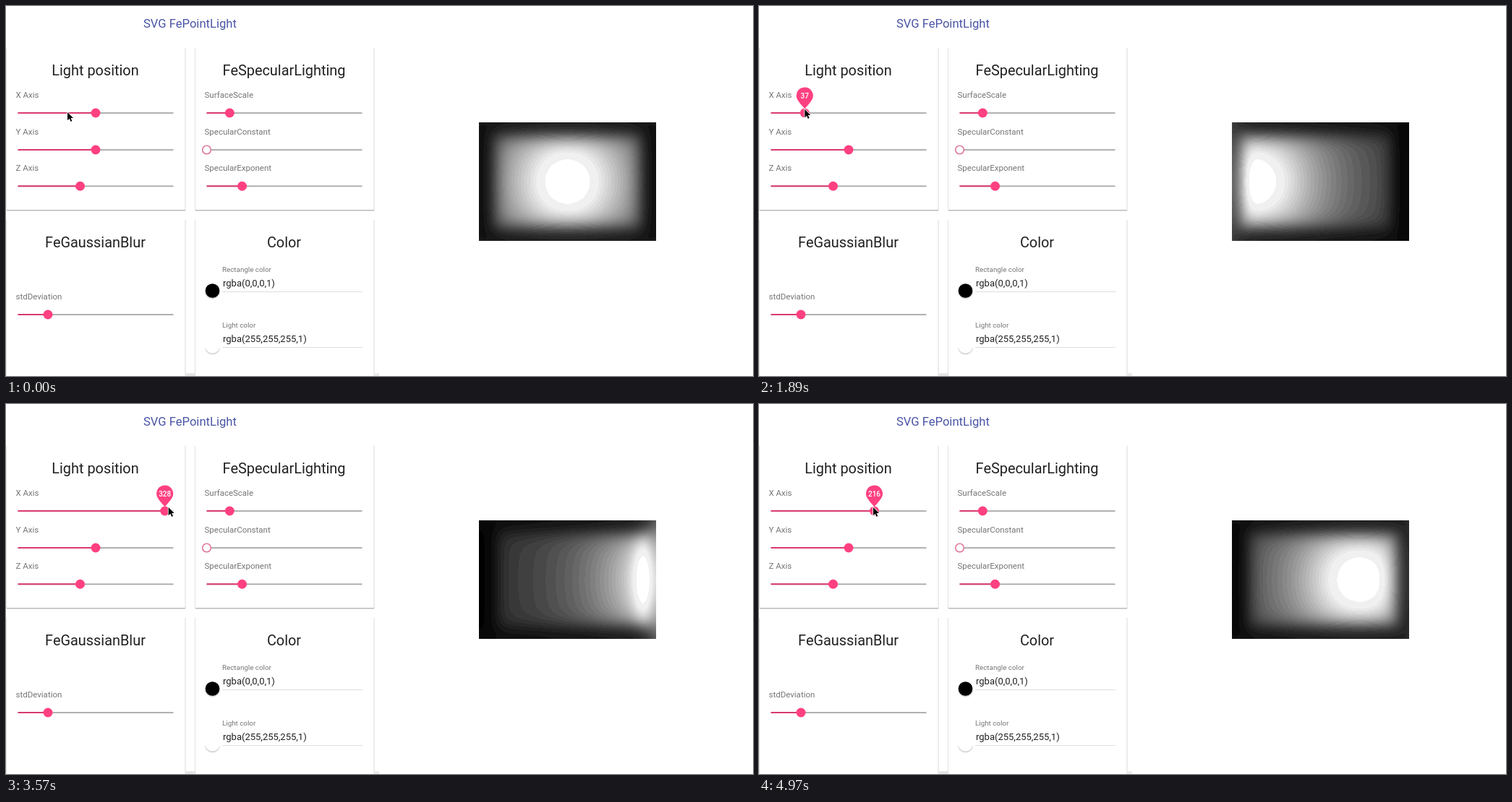
An HTML page with a canvas for the animation above (5.04 s loop, 1033x512 px).

```html
<!DOCTYPE html>
<html lang="en">
<head>
<meta charset="utf-8">
<style>
  html, body { margin: 0; width: 1033px; height: 512px; overflow: hidden; background: #fff; }
  canvas { display: block; }
</style>
</head>
<body>
<canvas id="stage" width="1033" height="512"></canvas>
<script>
const LOOP = 5040, STEP = 70, DRAG_START = 980;
const PINK = '#ff4081', TRACK = 215;
const ctx = document.getElementById('stage').getContext('2d');

// 0 before start, 1 after end, smooth in between
function ease(t, start, end) {
  const p = Math.min(1, Math.max(0, (t - start) / (end - start)));
  return p * p * (3 - 2 * p);
}

// X axis value: drag left, drag right, drag back, small correction
const xAxis = t => 150 - 113 * ease(t, DRAG_START, 1600) + 291 * ease(t, 2740, 3035)
  - 109 * ease(t, 3640, 4130) - 3 * ease(t, 4620, 4900);
const partOf = value => (value + 50) / 400;
const knobX = t => 16.5 + partOf(xAxis(t)) * TRACK;

// The light only catches up with the slider when the pointer rests
const repaints = [0, 1610, 3150, 4480, 4900];
const lightAt = t => xAxis(repaints.filter(r => r <= t).pop());

const cursorX = t => knobX(t) - 39 * (1 - ease(t, 0, 840))
  + 5 * ease(t, 3000, 3400) - 6.5 * ease(t, 3640, 4130);
const cursorY = t => 147 + 5 * ease(t, 0, 840) - 9 * ease(t, DRAG_START, 1470);

function text(str, x, y, size, color, align = 'left', weight = 400) {
  ctx.font = `${weight} ${size}px Roboto, sans-serif`;
  ctx.textAlign = align;
  ctx.fillStyle = color;
  ctx.fillText(str, x, y);
}

function rect(x, y, w, h, color) {
  ctx.fillStyle = color;
  ctx.fillRect(x, y, w, h);
}

function disc(x, y, r, color) {
  ctx.fillStyle = color;
  ctx.beginPath();
  ctx.arc(x, y, r, 0, 7);
  ctx.fill();
}

function card(x, y, h, title) {
  rect(x, y, 1, h, '#e2e2e2');
  rect(x + 247.5, y, 1, h, '#dcdcdc');
  rect(x + 1, y + h - 1, 247, 1, '#b8b8b8');
  rect(x + 1, y + h, 247, 1, '#dedede');
  text(title, x + 123.5, y + 38, 19.9, '#212121', 'center');
}

function slider(label, x, y, part) {
  text(label, x, y - 21, 11.5, '#757575');
  const left = x + 3, knob = left + part * TRACK;
  rect(left, y - 0.75, TRACK, 1.7, '#a4a4a4');
  if (part) {
    rect(left, y - 1, knob - left, 2, '#d93a72');
    disc(knob, y, 6.5, PINK);
  } else {
    disc(knob, y, 6.6, '#e07aa0');
    disc(knob, y, 4.9, '#fff');
  }
}

function colorField(label, value, y, swatch) {
  ctx.save();
  ctx.shadowBlur = 2;
  ctx.shadowOffsetY = 1;
  ctx.shadowColor = 'rgba(0,0,0,.3)';
  disc(285.5, y + 10, 9.8, swatch);
  ctx.restore();
  if (swatch === '#fff') rect(272, y - 4, 26, 16, '#fff');
  text(label, 299, y - 16, 9.8, '#757575');
  text(value, 300, y + 4, 13, '#212121');
  rect(299, y + 11, 194, 1, '#dedede');
}

function pin(x, value, grow) {
  ctx.save();
  ctx.translate(x, 142);
  ctx.scale(grow, grow);
  ctx.fillStyle = PINK;
  ctx.beginPath();
  ctx.arc(0, -18, 11.5, Math.PI * 0.83, Math.PI * 0.17);
  ctx.quadraticCurveTo(7, -7, 0, 0);
  ctx.quadraticCurveTo(-7, -7, -10, -12.2);
  ctx.fill();
  text(Math.round(value), 0, -14.3, 10, '#fff', 'center', 500);
  ctx.restore();
}

function cursor(x, y) {
  const arrow = new Path2D('M0 0V11.2L2.7 8.8L4.5 12.9L6.3 12.1L4.5 8.1H8Z');
  ctx.save();
  ctx.translate(x, y);
  ctx.strokeStyle = '#fff';
  ctx.lineWidth = 1.6;
  ctx.stroke(arrow);
  ctx.fillStyle = '#000';
  ctx.fill(arrow);
  ctx.restore();
}

// Specular point light over the blurred edge of a 300 x 200 plate
const W = 245, H = 164, SIGMA = 19.5, HEIGHT = 16.6, LIGHT_Z = 147, GAIN = 1.1, EXPONENT = 9.5;
const edge = u => 1 / (1 + Math.exp(-1.5976 * u - 0.07056 * u ** 3));
const profile = (u, len) => edge(u / SIGMA) - edge((u - len) / SIGMA);
const samples = (count, len) => Array.from({ length: count }, (_, i) => {
  const u = (i + 0.5) * len / count;
  return { u, alpha: profile(u, len), slope: profile(u + 0.5, len) - profile(u - 0.5, len) };
});
const cols = samples(W, 300), rows = samples(H, 200);
const plate = ctx.createImageData(W, H);
let litFor = null;

function shade(lightX) {
  if (lightX === litFor) return;
  litFor = lightX;
  let p = 0;
  for (const row of rows) for (const col of cols) {
    const nx = -HEIGHT * col.slope * row.alpha, ny = -HEIGHT * row.slope * col.alpha;
    const lx = lightX - col.u, ly = 100 - row.u, lz = LIGHT_Z - HEIGHT * col.alpha * row.alpha;
    const hz = lz + Math.hypot(lx, ly, lz);
    const dot = (nx * lx + ny * ly + hz) / (Math.hypot(nx, ny, 1) * Math.hypot(lx, ly, hz));
    const level = GAIN * Math.max(0, dot) ** EXPONENT;
    const gray = level >= 1 ? 255 : Math.min(240, Math.round(level * 32) * 8);
    plate.data.fill(gray, p, p + 3);
    plate.data[p + 3] = 255;
    p += 4;
  }
}

function draw(t) {
  rect(0, 0, 1033, 512, '#fff');
  text('SVG FePointLight', 190, 30, 16.6, '#4a55a5');

  card(0, 58, 225, 'Light position');
  slider('X Axis', 13.5, 148, partOf(xAxis(t)));
  slider('Y Axis', 13.5, 199, 0.5);
  slider('Z Axis', 13.5, 249.25, 0.4);

  card(261, 58, 225, 'FeSpecularLighting');
  slider('SurfaceScale', 274.5, 148, 0.148);
  slider('SpecularConstant', 274.5, 199, 0);
  slider('SpecularExponent', 274.5, 249.25, 0.228);

  card(0, 296, 230, 'FeGaussianBlur');
  slider('stdDeviation', 13.5, 427, 0.193);

  card(261, 296, 230, 'Color');
  colorField('Rectangle color', 'rgba(0,0,0,1)', 384, '#000');
  colorField('Light color', 'rgba(255,255,255,1)', 461, '#fff');
  rect(249, 508, 12, 4, '#e6e6e6');
  rect(509, 508, 7, 4, '#ececec');

  shade(lightAt(t));
  ctx.putImageData(plate, 654, 161);

  if (t > DRAG_START) pin(knobX(t), xAxis(t), ease(t, DRAG_START, 1190));
  cursor(cursorX(t), cursorY(t));
}

function tick() {
  const t = performance.now() % LOOP;
  draw(Math.floor(t / STEP) * STEP);
  requestAnimationFrame(tick);
}
tick();
</script>
</body>
</html>
```
